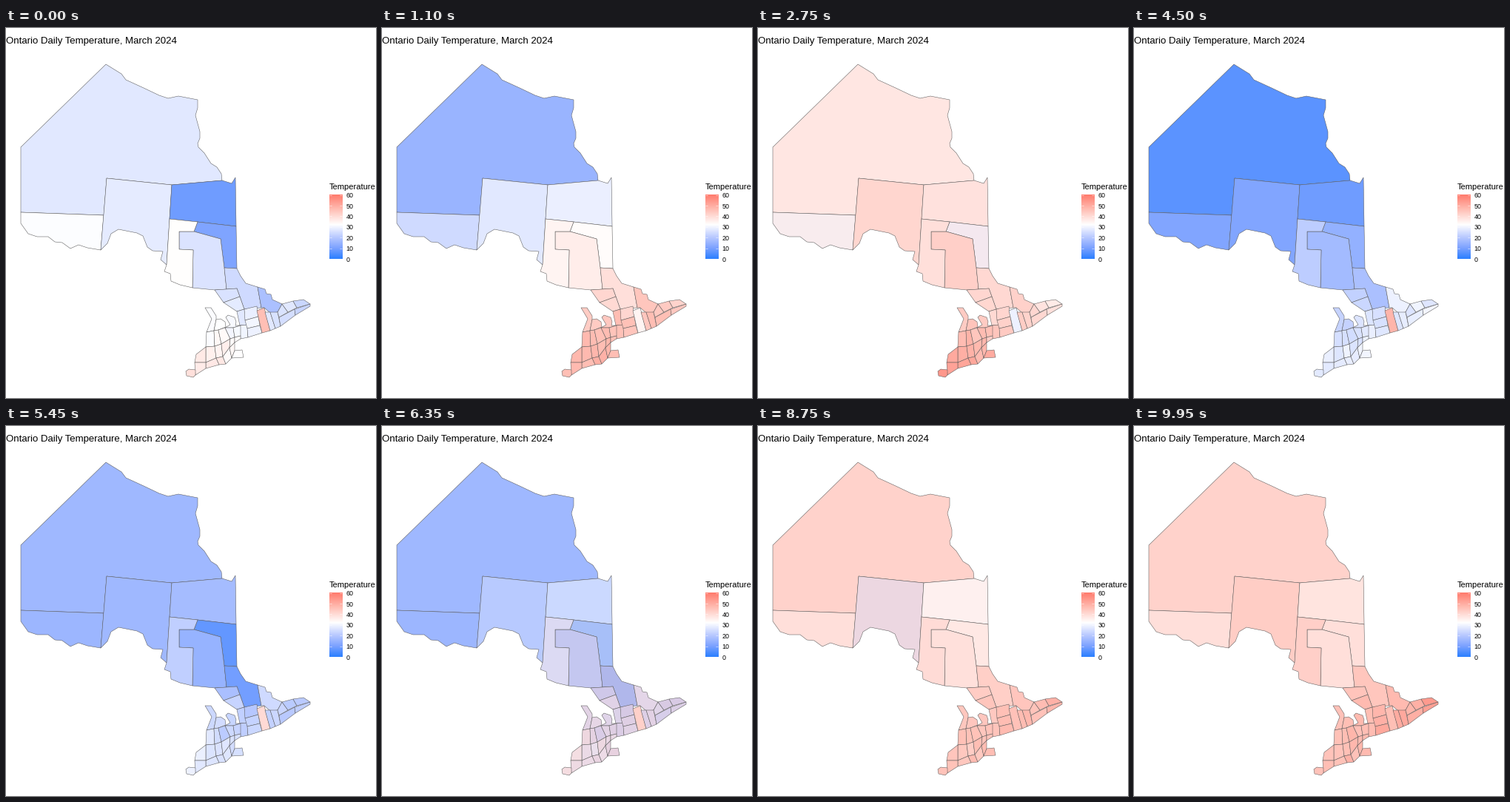
A matplotlib script for the animation above (10000 ms loop, 500 by 500 pixels).

```python
import numpy as np
import matplotlib.pyplot as plt
from matplotlib.animation import FuncAnimation
from matplotlib.collections import LineCollection, PolyCollection
from matplotlib.colors import to_rgb

SIZE, DPI = 500, 100
FRAMES, STEP = 200, 50
PX = 72 / DPI  # points per pixel

plt.rcParams["font.family"] = "Liberation Sans"
rng = np.random.default_rng(4)

# Temperature scale: blue - white - red
STOPS = [0, 10, 20, 32, 46, 60]
STOP_RGB = np.array([to_rgb(c) for c in (
    "#2a7fff", "#7ba1ff", "#b7c8ff", "#ffffff", "#ffbfb5", "#ff7a6c")])

TIMES = [0, 1100, 2750, 4500, 5450, 7500, 9950]
# The far north stays cold, then warms quickly
LATE = [0, 1100, 2750, 4500, 5250, 7350, 7500, 8350]

# Southern weather at each key time: level, eastward and southward slope
LEVEL = np.array([31, 45, 45, 26, 23.5, 43, 47])
EAST = np.array([-2.5, 1, -1, 3.5, 0, 0.5, 3])
SOUTH = np.array([4, 3, 5, 3.5, 3, 1.2, 0.8])


def ramp(temp):
    return np.stack([np.interp(temp, STOPS, STOP_RGB[:, k])
                     for k in range(3)], axis=-1)


def color(key):
    return np.array(to_rgb(key)) if isinstance(key, str) else ramp(key)


def weather(points):
    x, y = points.mean(axis=0)
    return (LEVEL + EAST * (x - 310) / 60 + SOUTH * (y - 410) / 40
            + rng.normal(0, 1.2, len(TIMES)))


outlines, tracks = [], []


def region(points, keys=None, times=TIMES):
    """Add a district; without keys its colour follows the southern weather."""
    points = np.array(points, float)
    outlines.append(points)
    keys = weather(points) if keys is None else keys
    tracks.append((times, np.array([color(k) for k in keys])))


def mesh(*rows):
    """Add the four-sided districts between neighbouring rows of points."""
    for top, low in zip(rows, rows[1:]):
        for i in range(len(top) - 1):
            region([top[i], top[i + 1], low[i + 1], low[i]])


# Corners shared by the northern districts
WEST, MID, HUB = (20, 249), (132, 253), (224, 212)
TOP, LAKE, COAST = (136, 203), (128, 300), (292, 206)
FORK, SHORE = (221, 258), (217, 320)
NOTCH, BEND = (259, 262), (254, 275)
EDGE, GATE, CORNER = (311, 268), (312, 325), (295, 324)
ELBOW = (290, 285)
INNER = [(234, 275), (234, 299), (253, 300), (252, 351)]
BAY, SOUND, RIVER = (298, 353), (316, 363), (340, 350)

region([(20, 161), (135, 49), (156, 62), (162, 70), (186, 81), (207, 91),
        (219, 95), (233, 92), (259, 97), (259, 108), (256, 118), (262, 140),
        (262, 149), (259, 156), (260, 161), (268, 169), (277, 183), (285, 188),
        (291, 197), COAST, HUB, TOP, MID, WEST],
       [27, 15, 37.5, 6, 16, 16, "#ebe7f5", 41.8], LATE)
region([WEST, MID, LAKE, (110, 297), (98, 293), (87, 298), (76, 290),
        (66, 289), (57, 282), (42, 282), (30, 278), (20, 264)],
       [31.5, 24, "#f8ecee", 11, 15.5, 15.5, "#f0ecf6", 39], LATE)
region([TOP, HUB, FORK, SHORE, (209, 313), (212, 302), (198, 301), (191, 296),
        (185, 281), (177, 277), (152, 272), (142, 278), (137, 291), LAKE],
       [27.7, 27, 41, 11, 16, 25.5, 43])
region([HUB, COAST, (305, 210), (310, 202), EDGE, NOTCH, FORK],
       [8.5, 28.6, 38.5, 8.5, 17, 31.5, 38])
region([NOTCH, EDGE, GATE, CORNER, ELBOW, BEND],
       [10.7, 32.7, "#f4e8ef", 14, 7, 35, 39])
region([*INNER, (282, 354), BAY, CORNER, ELBOW, BEND],
       [26, 36, 42.5, 16.7, 14.5, 38.5, 39])
region([FORK, NOTCH, BEND, *INNER, (235, 347), (223, 342), (222, 332),
        (214, 329), SHORE],
       [32.3, 34.4, 39, 21, 21.5, 37, 42.5])
region([CORNER, GATE, (317, 335), (324, 345), RIVER, (345, 378), (322, 380),
        SOUND, (312, 352), BAY],
       [24, 39, 40.5, 18, 9, 40.5, 44.5])
region([RIVER, (350, 353), (352, 359), (358, 360), (360, 367), (373, 373),
        (367, 384), (357, 385), (349, 378), (345, 378)],
       [18, 44.5, 42, 29, 24, 42, 47])

# Bay shore and the lake country beside it
mesh([(282, 354), (312, 352)], [(294, 371), SOUND], [(312, 383), (322, 380)],
     [(316, 402), (326, 401)], [(317, 420), (327, 418)])
mesh([(322, 380), (339, 376)], [(323, 395), (341, 390)],
     [(326, 406), (343, 402)], [(327, 418), (346, 412)])
region([(339, 382), (349, 378), (357, 409), (346, 412)],
       [46, 34.5, 29, 48, 40, 45, 46])

# East
mesh([(350, 384), (357, 384), (367, 384)], [(357, 409), (364, 406), (371, 403)])
mesh([(367, 384), (373, 373), (388, 369), (402, 367)],
     [(369, 391), (381, 384), (393, 378), (411, 373)])
mesh([(369, 391), (390, 380), (411, 373)], [(371, 403), (391, 388), (411, 376)])

# Peninsulas and the south west
region([(269, 378), (277, 378), (284, 389), (284, 394), (281, 409),
        (271, 411), (278, 393)])
region([(284, 394), (290, 393), (296, 397), (297, 404), (287, 408), (281, 409)])
region([(297, 391), (300, 388), (309, 391), (311, 397), (310, 402), (316, 402),
        (307, 405), (296, 405), (303, 401)])
MIDDLE = [(270, 452), (284, 446), (293, 444), (302, 432), (309, 425)]
mesh([(271, 411), (281, 409), (287, 408), (296, 405), (307, 405), (317, 402)],
     [(270, 431), (282, 430), (291, 427), (303, 420), (309, 418), (317, 416)],
     [*MIDDLE, (317, 420)])
mesh(MIDDLE, [(270, 460), (288, 455), (297, 454), (305, 446), (309, 436)])
mesh([(257, 441), (270, 431)], [(255, 452), (270, 452)],
     [(256, 469), (270, 460)])
region([(309, 436), (319, 435), (321, 445), (305, 446)])
region([(243, 464), (247, 461), (256, 462), (256, 469), (253, 472), (244, 470)])

fig = plt.figure(figsize=(SIZE / DPI, SIZE / DPI), dpi=DPI, facecolor="white")
ax = fig.add_axes([0, 0, 1, 1])

# Legend
LEFT, RIGHT, UPPER, LOWER = 437, 454.3, 225.5, 311.9
ax.imshow(ramp(np.linspace(60, 0, 300))[:, None], aspect="auto",
          extent=(LEFT, RIGHT, LOWER, UPPER))
ticks = []
for temp in range(0, 61, 10):
    y = LOWER + (UPPER - LOWER) * temp / 60
    ticks += [[(LEFT, y), (LEFT + 3.4, y)], [(RIGHT - 3.4, y), (RIGHT, y)]]
    ax.text(459.6, y + 3.6, str(temp), size=8.9 * PX, va="baseline")
ax.add_collection(LineCollection(ticks, colors="white", linewidths=0.5 * PX))
ax.text(436.8, 218.5, "Temperature", size=11.1 * PX, va="baseline")
ax.text(0, 21.5, "Ontario Daily Temperature, March 2024", size=13.27 * PX,
        va="baseline")

districts = PolyCollection(outlines, edgecolors="#595959",
                           linewidths=0.52 * PX, joinstyle="round")
ax.add_collection(districts)
ax.set_xlim(0, SIZE)
ax.set_ylim(SIZE, 0)
ax.axis("off")


def draw(frame):
    now = frame * STEP
    districts.set_facecolor([
        [np.interp(now, times, rgb[:, k]) for k in range(3)]
        for times, rgb in tracks])
    return [districts]


anim = FuncAnimation(fig, draw, frames=FRAMES, interval=STEP, repeat=True,
                     repeat_delay=0, blit=False)
plt.show()
```
